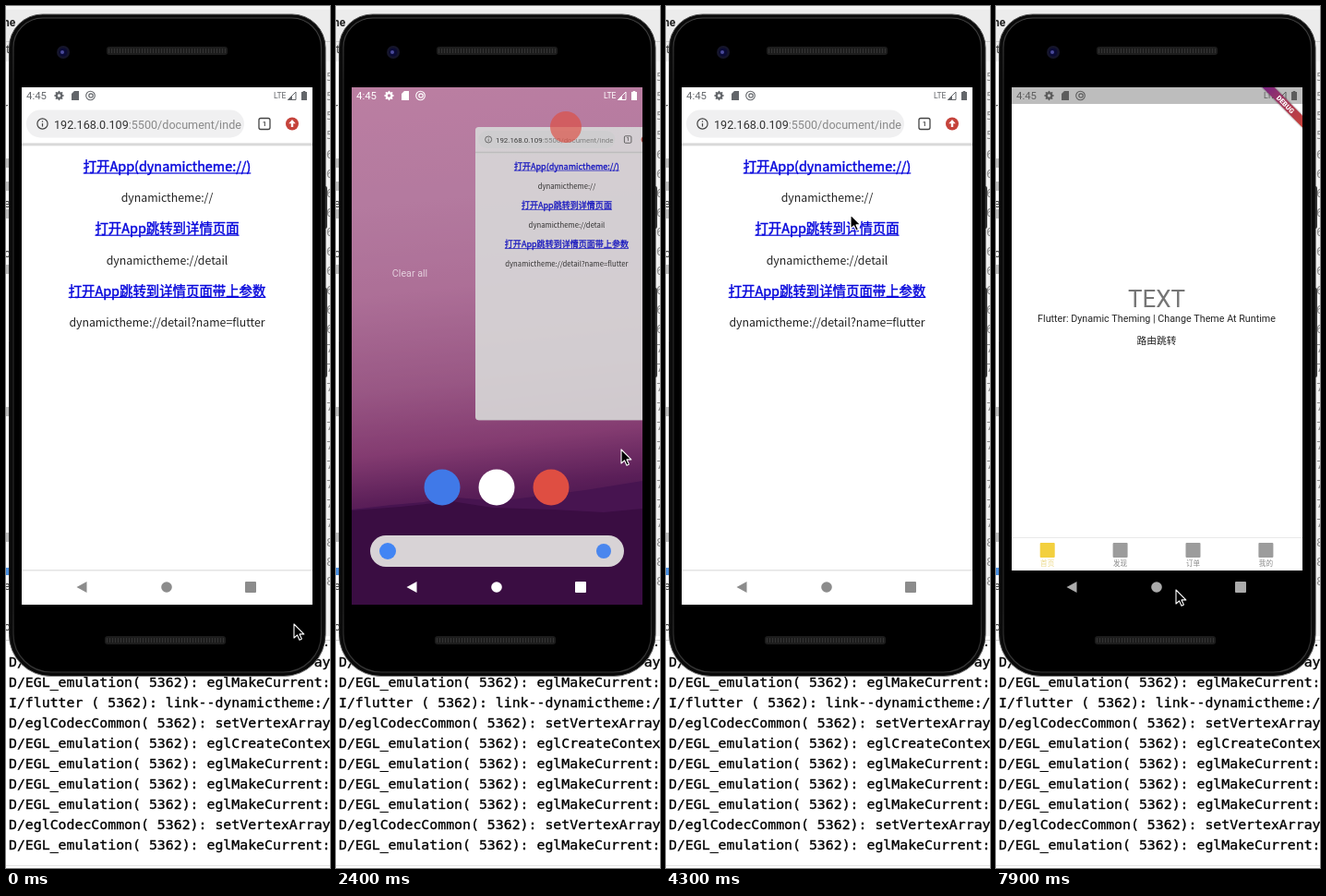
These frames come from a looping animation (351x933 px, 8 s). An HTML page with a canvas:

```html
<!DOCTYPE html>
<html lang="zh">
<head>
<meta charset="utf-8">
<style>
html, body { margin: 0; width: 100%; height: 100%; overflow: hidden; background: #fff; }
canvas { display: block; width: 351px; height: 933px; }
</style>
</head>
<body>
<canvas id="stage"></canvas>
<script>
const W = 351, H = 933, LOOP = 8000, STEP = 100;
const SCREEN = { x: 17, y: 88, w: 315, h: 560 };
const CARD = { y: 119.7, scale: 0.628, gap: 208 };
const SANS = 'Roboto, "Noto Sans CJK SC", sans-serif';
const CJK = '"Noto Sans CJK SC", "Noto Sans CJK", sans-serif';
const MONO = '"DejaVu Sans Mono", monospace';

const canvas = document.getElementById('stage');
const ctx = canvas.getContext('2d');
const dpr = window.devicePixelRatio || 1;
canvas.width = W * dpr;
canvas.height = H * dpr;

const lerp = (a, b, p) => a + (b - a) * p;
const ramp = (t, from, to) => Math.min(1, Math.max(0, (t - from) / (to - from)));
const ease = p => p * p * (3 - 2 * p);

function rect(x, y, w, h, color) {
  ctx.fillStyle = color;
  ctx.fillRect(x, y, w, h);
}

function round(x, y, w, h, r, color) {
  ctx.beginPath();
  ctx.roundRect(x, y, w, h, r);
  if (color) { ctx.fillStyle = color; ctx.fill(); }
}

function circle(x, y, r, color) {
  ctx.beginPath();
  ctx.arc(x, y, r, 0, Math.PI * 2);
  if (color) { ctx.fillStyle = color; ctx.fill(); }
}

function poly(points, color) {
  ctx.beginPath();
  points.forEach(([x, y]) => ctx.lineTo(x, y));
  ctx.closePath();
  ctx.fillStyle = color;
  ctx.fill();
}

function stroke(color, width) {
  ctx.strokeStyle = color;
  ctx.lineWidth = width;
  ctx.stroke();
}

function gradient(x0, y0, x1, y1, stops) {
  const g = ctx.createLinearGradient(x0, y0, x1, y1);
  stops.forEach(([p, c]) => g.addColorStop(p, c));
  return g;
}

// y is the middle of the capital letters; bold thickens the strokes without widening the text
function text(s, x, y, size, color, { align = 'center', weight = 400, font = SANS, bold = 0 } = {}) {
  ctx.font = `${weight} ${size}px ${font}`;
  ctx.textAlign = align;
  ctx.fillStyle = color;
  ctx.fillText(s, x, y + size * 0.36);
  if (bold) {
    ctx.strokeStyle = color;
    ctx.lineWidth = bold;
    ctx.strokeText(s, x, y + size * 0.36);
  }
  return ctx.measureText(s).width;
}

function layer(alpha, draw) {
  if (alpha <= 0) return;
  ctx.save();
  ctx.globalAlpha *= alpha;
  draw();
  ctx.restore();
}

function editor() {
  rect(0, 0, W, H, '#fff');
  rect(0, 0, W, 60, '#ececec');
  rect(0, 0, W, 4, '#f6f6f6');
  rect(0, 38, W, 1, '#cfcfcf');
  text('the', -7, 18, 12, '#222', { align: 'left', weight: 700 });
  text('t', 0, 47, 12, '#333', { align: 'left' });
  [[110, 'r'], [214, 'e'], [268, 'o'], [628, 'e'], [672, 'c']].forEach(([y, s]) =>
    text(s, -2, y, 12, '#333', { align: 'left' }));
  [170, 195, 225, 285, 439, 575].forEach(y => rect(0, y - 5, 5, 10, '#bdbdbd'));
  rect(0, 608, 5, 8, '#4a90e2');
  rect(343, 60, 8, 622, '#f1f1f1');
  for (let i = 0; i < 27; i++)
    text(String(56 + i), 347, 76 + i * 21, 13, '#8c8c8c', { align: 'left', font: MONO });
  rect(0, 682, W, 251, '#fff');
  rect(0, 686, W, 1, '#cfcfcf');
  rect(0, 930, W, 1, '#e2e2e2');

  const egl = 'D/EGL_emulation( 5362): eglMakeCurrent:';
  const codec = 'D/eglCodecCommon( 5362): setVertexArray';
  const lines = [codec, egl, 'I/flutter ( 5362): link--dynamictheme:/', codec,
    'D/EGL_emulation( 5362): eglCreateContex', egl, egl, egl, codec, egl];
  lines.forEach((s, i) =>
    text(s, 3, 709.3 + i * 22, 14.85, '#000', { align: 'left', font: MONO, bold: 0.35 }));
  rect(346, 691, 2, 2, '#222');
}

function grille(x, y) {
  round(x, y, 131, 9, 3, '#1d1d1d');
  for (let i = 2; i < 129; i += 3) rect(x + i, y + 2, 1, 5, '#333');
}

function phone() {
  round(344, 195, 4, 46, 2, '#3a3a3a');
  round(344, 305, 4, 97, 2, '#3a3a3a');
  round(3.5, 9, 342.5, 716.5, [36, 36, 45, 45], '#0a0a0a');
  stroke(gradient(0, 9, 0, 726, [[0, '#555'], [0.1, '#222'], [0.92, '#222'], [1, '#888']]), 1);
  round(8, 13, 333.5, 708, [32, 32, 41, 41], '#000');
  stroke(gradient(0, 9, 0, 726, [[0, '#444'], [0.1, '#262626'], [0.9, '#262626'], [1, '#3a3a3a']]), 1.2);
  grille(109, 44);
  grille(107, 682);
  circle(62, 50, 7, '#15152a');
  circle(62, 50, 4.5, '#0a0a35');
  circle(61, 50, 2, '#4a4a9a');
}

function wallpaper(scrim) {
  const sky = gradient(150, 88, 200, 548, [[0, '#efb2cf'], [0.25, '#e6accb'], [0.46, '#dc9dc0'],
    [0.68, '#c07ba6'], [0.83, '#a2548a'], [0.94, '#692c68'], [1, '#50205c']]);
  rect(17, 88, 315, 560, sky);
  poly([[17, 545], [60, 540], [95, 537], [120, 531], [175, 536], [215, 531], [270, 524], [332, 514],
    [332, 648], [17, 648]], '#4c1c5c');
  poly([[17, 546], [70, 542], [125, 536], [170, 543], [235, 545], [290, 548], [332, 544],
    [332, 648], [17, 648]], '#3a1248');
  rect(17, 88, 315, 560, `rgba(60,0,52,${0.44 * scrim})`);
}

function dock() {
  circle(115, 521, 19.5, '#4079e8');
  circle(174, 521, 19.5, '#fff');
  circle(233, 521, 19.5, '#df4e42');
  round(37, 573, 275, 34, 17, '#d8d3d6');
  circle(56, 590, 9, '#4285f4');
  circle(290, 590, 8, '#4a86ee');
}

function statusBar(color) {
  text('4:45', 22, 97, 11.4, color, { align: 'left' });
  circle(57.5, 97, 2.8);
  stroke(color, 2.2);
  for (let i = 0; i < 8; i++) {
    const a = i * Math.PI / 4;
    circle(57.5 + 4.3 * Math.cos(a), 97 + 4.3 * Math.sin(a), 0.9, color);
  }
  poly([[71, 95], [74, 92], [79, 92], [79, 102], [71, 102]], color);
  circle(91.5, 97, 4.8);
  stroke(color, 1.1);
  circle(92, 97, 2.2);
  stroke(color, 1.2);
  text('LTE', 290, 97, 8.6, color, { align: 'left' });
  ctx.beginPath();
  ctx.moveTo(305.5, 101.5);
  ctx.lineTo(314, 101.5);
  ctx.lineTo(314, 93);
  ctx.closePath();
  stroke(color, 1);
  poly([[305, 102], [310, 97], [310, 102]], color);
  rect(320, 93, 6, 9, color);
  rect(321.7, 92, 2.6, 1, color);
}

function navBar(color) {
  poly([[76.5, 629], [87.5, 623], [87.5, 635]], color);
  circle(174, 629, 5.8, color);
  round(259, 623, 12, 12, 1, color);
}

function link(s, y) {
  const blue = '#0808dc';
  const w = text(s, 174.5, y, 14.4, blue, { font: CJK, bold: 0.45 });
  rect(174.5 - w / 2, y + 6.4, w, 1.2, blue);
}

function browser() {
  rect(17, 88, 315, 560, '#fff');
  round(22, 112.5, 236, 30, 15, '#f0f0f1');
  circle(39.5, 127.5, 5.6);
  stroke('#444', 1.2);
  rect(38.9, 127, 1.2, 3.6, '#444');
  rect(38.9, 124.4, 1.2, 1.3, '#444');
  const host = text('192.168.0.109', 52, 128, 12.6, '#333', { align: 'left' });
  text(':5500/document/inde', 52 + host, 128, 12.6, '#8a8a8a', { align: 'left' });
  round(274, 121.5, 12, 12, 2);
  stroke('#444', 1.3);
  text('1', 280, 127.5, 8, '#333', { weight: 500 });
  circle(310, 127.5, 7, '#c5433b');
  poly([[310, 123], [313.8, 127.3], [306.2, 127.3]], '#fff');
  rect(308.8, 127, 2.4, 4, '#fff');
  rect(17, 148, 315, 1, '#e6e6e6');
  rect(17, 149, 315, 2, '#d9d9d9');
  rect(17, 151, 315, 1, '#f1f1f1');
  const rows = [['打开App(dynamictheme://)', 'dynamictheme://'],
    ['打开App跳转到详情页面', 'dynamictheme://detail'],
    ['打开App跳转到详情页面带上参数', 'dynamictheme://detail?name=flutter']];
  rows.forEach(([title, address], i) => {
    link(title, 174 + i * 67.2);
    text(address, 174.5, 208 + i * 67.2, 12.3, '#222', { font: CJK });
  });
  rect(17, 610, 315, 1.5, '#e4e4e4');
}

function home() {
  rect(17, 88, 315, 523, '#fff');
  text('TEXT', 174, 316.5, 26, '#757575');
  text('Flutter: Dynamic Theming | Change Theme At Runtime', 174, 338, 10.74, '#262626');
  text('路由跳转', 174, 362.5, 10.74, '#222');
  rect(17, 575, 315, 1, '#e9e9e9');
  ['首页', '发现', '订单', '我的'].forEach((name, i) => {
    const x = 55.7 + i * 78.9;
    round(x - 8, 581, 16, 16, 1, i ? '#9c9c9c' : '#f3d03e');
    text(name, x, 603, 7.6, i ? '#8a8a8a' : '#ecd98a');
  });
}

function detail() {
  const blue = '#4a4afa';
  rect(17, 88, 315, 523, '#fff');
  rect(17, 106, 315, 43, '#f6f6f6');
  rect(17, 148.5, 315, 1, '#d6d6d6');
  ctx.beginPath();
  ctx.moveTo(31.5, 124);
  ctx.lineTo(24, 131.5);
  ctx.lineTo(31.5, 139);
  stroke(blue, 2.2);
  text('详情', 174, 131.5, 13, '#111', { weight: 700 });
  text('TITLE', 174.5, 316.5, 26, '#757575');
  text('弹窗', 174, 350, 12.8, blue);
  text('Detail', 174, 382, 12.6, blue);
  text('返回NewList', 174, 417, 12.6, blue);
  text('底部弹窗', 174, 450, 12.7, blue);
}

function banner() {
  ctx.save();
  ctx.beginPath();
  ctx.rect(17, 88, 315, 523);
  ctx.clip();
  ctx.translate(332, 88);
  ctx.rotate(Math.PI / 4);
  rect(-46, 20.5, 92, 11.4, 'rgba(0,0,0,.16)');
  rect(-46, 21.5, 92, 9.2, gradient(-30, 0, 30, 0, [[0, '#7a2482'], [0.45, '#a23a5c'], [1, '#c94038']]));
  text('DEBUG', 0, 26.1, 7.4, '#fff', { weight: 900 });
  ctx.restore();
}

// Places a full-size page as a scaled window, trimmed at its top and bottom edges.
function pageAt(page, x, y, scale, top, bottom, radius, dim = 0) {
  ctx.save();
  ctx.translate(x, y);
  ctx.scale(scale, scale);
  ctx.translate(-SCREEN.x, -SCREEN.y);
  ctx.beginPath();
  ctx.roundRect(17, top, 315, bottom - top, radius);
  ctx.clip();
  page();
  if (dim) rect(17, 88, 315, 560, `rgba(0,0,0,${dim})`);
  ctx.restore();
}

function recents(t) {
  const shrink = ease(ramp(t, 500, 800));
  const scroll = ease(ramp(t, 900, 1300));
  const swipe = ramp(t, 1550, 1850);
  const close = ease(ramp(t, 1850, 2100));
  const shown = 1 - ramp(t, 2300, 2600);
  const solid = 1 - (1 - shown) ** 2;
  const appX = lerp(-132.5, 151, scroll);
  const webX = lerp(75.5, 359, scroll) - CARD.gap * close;
  const dim = 0.09 + (1 - shown) * 0.2;

  wallpaper(shown);
  dock();
  layer(shown * shrink, () => {
    text('Clear all', appX - 71, 289.5, 10.7, '#fff');
    if (swipe < 1) {
      const lift = 330 * swipe * swipe;
      layer(1 - swipe, () => {
        pageAt(() => { home(); banner(); }, appX, CARD.y - lift, CARD.scale, 106, 611, 6, dim);
        circle(appX + 98, 131 - lift, 17, '#4a70c4');
      });
    }
  });
  layer(solid, () =>
    pageAt(browser, lerp(17, webX, shrink), lerp(88, CARD.y, shrink), lerp(1, CARD.scale, shrink),
      lerp(88, 106, shrink), lerp(648, 611, shrink), 6 * shrink, dim * shrink));
  layer(shown * shrink, () => circle(webX + 98, 131, 17, '#df4e42'));
  statusBar('#fff');
  navBar('#fff');
}

function launcher(t) {
  const p = ramp(t, 2880, 3051);
  wallpaper(0);
  dock();
  navBar('#fff');
  if (p > 0) {
    const s = 0.8 + 0.2 * p;
    pageAt(browser, 17 + 157.5 * (1 - s), 88 + 145 * (1 - p), s, 88, 648, 6);
    ctx.beginPath();
    ctx.moveTo(88, 635);
    ctx.lineTo(77, 629);
    stroke('#e6e6e6', 1);
    ctx.beginPath();
    ctx.arc(174, 629, 6, 0, Math.PI);
    stroke('#e6e6e6', 1);
    round(259, 623, 12, 12, 1);
    stroke('#ececec', 1);
  }
  statusBar('#fff');
}

function app(t) {
  const detailShown = t < 6800 ? ramp(t, 6100, 6300) : 1 - ramp(t, 6900, 7150);
  rect(17, 88, 315, 560, '#000');
  rect(17, 88, 315, 523, '#fff');
  if (t >= 5600) {
    home();
    layer(detailShown, detail);
  }
  rect(17, 88, 315, 18, 'rgba(0,0,0,.26)');
  statusBar('#5c5c5c');
  if (t >= 5600) banner();
  navBar('#ababab');
}

function fullBrowser() {
  browser();
  statusBar('#63666a');
  navBar('#8c8c8c');
}

function screen(t) {
  ctx.save();
  ctx.beginPath();
  ctx.rect(SCREEN.x, SCREEN.y, SCREEN.w, SCREEN.h);
  ctx.clip();
  if (t <= 500) fullBrowser();
  else if (t < 2600) recents(t);
  else if (t < 3100) launcher(t);
  else {
    const open = ramp(t, 4600, 4900);
    if (open < 1) fullBrowser();
    layer(open, () => {
      ctx.translate(0, 60 * (1 - open));
      app(t);
    });
  }
  ctx.restore();
}

const CURSOR = [[0, 312, 669], [400, 264, 630], [600, 264, 630], [900, 110, 300], [1300, 250, 310],
  [1500, 197, 420], [1800, 205, 180], [2200, 309, 480], [2400, 309, 480], [2800, 234, 519],
  [3100, 234, 519], [4300, 200, 226], [4500, 200, 240], [5200, 200, 240], [6200, 216, 274],
  [6800, 26, 130], [7000, 26, 130], [7900, 195, 632], [8000, 195, 632]];

function cursor(t) {
  const i = CURSOR.findIndex(k => k[0] > t);
  const [a, b] = [CURSOR[i - 1], CURSOR[i]];
  const p = ease(ramp(t, a[0], b[0]));
  ctx.save();
  ctx.translate(lerp(a[1], b[1], p), lerp(a[2], b[2], p));
  poly([[0, 0], [0, 15], [3.5, 11.8], [6, 17.2], [8.4, 16.1], [6, 10.9], [10.8, 10.9]], '#000');
  ctx.lineJoin = 'round';
  stroke('#fff', 1.1);
  ctx.restore();
}

function render(now) {
  const t = Math.floor((now % LOOP) / STEP) * STEP;
  ctx.setTransform(dpr, 0, 0, dpr, 0, 0);
  ctx.lineJoin = 'round';
  editor();
  phone();
  screen(t);
  cursor(t);
}

const start = performance.now();
function tick() {
  render(performance.now() - start);
  requestAnimationFrame(tick);
}
tick();
</script>
</body>
</html>
```
